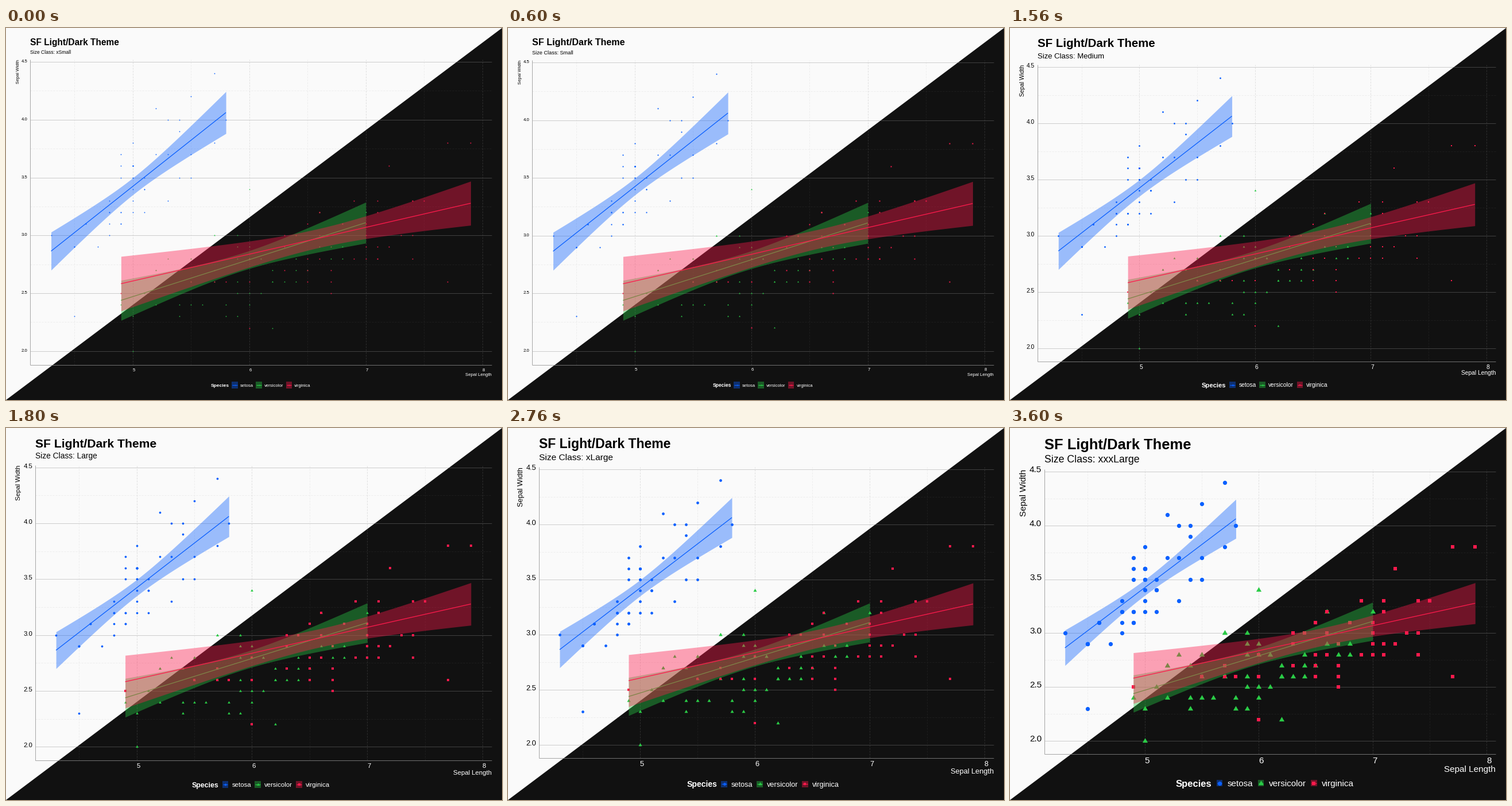
Write a matplotlib script that moves like this. It is 864 by 648 pixels and loops after 4200 ms.

```python
import numpy as np
import matplotlib.pyplot as plt
from matplotlib.animation import FuncAnimation
from matplotlib.patches import Polygon, Rectangle

W, H, RIGHT = 864, 648, 846
plt.rcParams["font.family"] = "Liberation Sans"
fig = plt.figure(figsize=(W / 72, H / 72), dpi=72)  # 1 pt equals 1 px
ax = fig.add_axes([0, 0, 1, 1])

LIGHT, DARK = "#fafafa", "#111111"
HALVES = [
    dict(corners=[(0, 0), (W, 0), (0, H)], major="#cdcdcd",
         vertical="#dfdfdf", minor="#ededed", axis="#a6a6a6"),
    dict(corners=[(W, 0), (W, H), (0, H)], major="#404040",
         vertical="#2e2e2e", minor="#1d1d1d", axis="#707070"),
]

# stats: mean and sd of length, mean and sd of width, correlation
# edge: the points that stand apart from the cloud
SPECIES = [
    dict(name="setosa", color="#0a60ff", marker="o", scale=1.0,
         stats=(5.006, 0.3525, 3.428, 0.3791, 0.7425),
         edge=[(4.3, 3.0), (4.5, 2.3), (5.2, 4.1), (5.5, 4.2), (5.7, 4.4),
               (5.7, 3.8), (5.8, 4.0), (5.5, 3.5)]),
    dict(name="versicolor", color="#2acb46", marker=(3, 0, 0), scale=1.47,
         stats=(5.936, 0.5162, 2.770, 0.3138, 0.5259),
         edge=[(4.9, 2.4), (5.0, 2.0), (5.0, 2.3), (5.2, 2.7), (6.2, 2.2),
               (6.0, 3.4), (6.8, 2.8), (7.0, 3.2)]),
    dict(name="virginica", color="#ff1a4c", marker="s", scale=0.9,
         stats=(6.588, 0.6359, 2.974, 0.3225, 0.4572),
         edge=[(4.9, 2.5), (6.0, 2.2), (6.7, 2.5), (7.7, 2.6), (7.4, 2.8),
               (7.2, 3.6), (7.7, 3.8), (7.9, 3.8)]),
]
COUNT = 50

# size class, title size, base text size
CLASSES = [
    ("xSmall", 15.5, 7.7), ("Small", 16.1, 7.8), ("Medium", 20.5, 10.3),
    ("Large", 21.1, 11.4), ("xLarge", 23, 12.8), ("xxLarge", 24.2, 13.9),
    ("xxxLarge", 25.45, 15.3),
]

CAP = 0.72  # cap height in ems


def sample(sp, rng):
    """Correlated cloud on a 0.1 grid, plus the edge points."""
    mx, sdx, my, sdy, r = sp["stats"]
    z = rng.normal(size=(4 * COUNT, 2))
    z = z[np.hypot(*z.T) < 1.75][:COUNT - len(sp["edge"])]
    x = mx + sdx * z[:, 0]
    y = my + sdy * (r * z[:, 0] + np.sqrt(1 - r * r) * z[:, 1])
    return np.vstack([np.round(np.column_stack([x, y]), 1), sp["edge"]])


rng = np.random.default_rng(7)
for sp in SPECIES:
    sp["points"] = sample(sp, rng)


def layout(i):
    name, title, base = CLASSES[i]
    grow = base - 7.7
    return dict(
        name=name, title=title, base=base,
        sub=0.92 * title - 5.7,
        sub_y=41.5 + 1.256 * (title - 15.5),
        left=round(42 + 2.37 * grow),
        top=55 + 1.74 * (title - 15.5),
        bottom=587 - 1.9 * grow - 0.086 * grow ** 2,
        legend_y=622 - 0.06 * grow ** 2,
        dot=1.8 + 0.37 * i ** 1.5,
    )


def scales(lay):
    def sx(x):
        return lay["left"] + (np.asarray(x) - 4.12) / 3.96 * (RIGHT - lay["left"])

    def sy(y):
        return lay["bottom"] - (np.asarray(y) - 1.88) / 2.64 * (lay["bottom"] - lay["top"])
    return sx, sy


def label(x, y, text, size, color="black", **kw):
    return ax.text(x, y, text, fontsize=size, color=color, va="baseline", **kw)


def mid(y, size):
    """Baseline that puts capitals centred on y."""
    return y + CAP / 2 * size


def draw_grid(lay, sx, sy):
    left, top, bottom = lay["left"], lay["top"], lay["bottom"]
    dash = (0, (3, 2))
    for half in HALVES:
        clip = Polygon(half["corners"], transform=ax.transData)

        def line(xs, ys, color, style="-"):
            ln, = ax.plot(xs, ys, color=half[color], lw=1, ls=style,
                          solid_capstyle="butt", zorder=1)
            ln.set_clip_path(clip)

        for y in np.arange(2.25, 4.5, 0.5):
            line((left, RIGHT), (sy(y),) * 2, "minor", dash)
        for x in np.arange(4.5, 8, 1):
            line((sx(x),) * 2, (bottom, top), "minor", dash)
        for x in range(5, 9):
            line((sx(x),) * 2, (bottom, top), "vertical", dash)
        for y in np.arange(2, 4.6, 0.5):
            line((left, RIGHT), (sy(y),) * 2, "major")
        line((left, left), (top, bottom), "axis")
        line((left, RIGHT), (bottom, bottom), "axis")


def draw_points(lay, sx, sy):
    for sp in SPECIES:
        x, y = sp["points"].T
        ax.plot(sx(x), sy(y), ls="", marker=sp["marker"], color=sp["color"],
                ms=lay["dot"] * sp["scale"], mew=0, zorder=2)


def draw_fits(sx, sy):
    """Regression lines with 95% bands, each species over the last."""
    for z, sp in enumerate(SPECIES, 3):
        mx, sdx, my, sdy, r = sp["stats"]
        lengths = sp["points"][:, 0]
        x = np.linspace(lengths.min(), lengths.max(), 80)
        y = my + r * sdy / sdx * (x - mx)
        err = sdy * np.sqrt((1 - r * r) * (COUNT - 1) / (COUNT - 2))
        sxx = (COUNT - 1) * sdx ** 2
        band = 2.0106 * err * np.sqrt(1 / COUNT + (x - mx) ** 2 / sxx)
        ax.fill_between(sx(x), sy(y - band), sy(y + band), color=sp["color"],
                        alpha=0.4, lw=0, zorder=z)
        ax.plot(sx(x), sy(y), color=sp["color"], lw=1.3,
                solid_capstyle="butt", zorder=z + 0.5)


def draw_labels(lay, sx, sy):
    left, top, bottom, base = (lay[k] for k in ("left", "top", "bottom", "base"))
    label(left, 18.4 + CAP * lay["title"], "SF Light/Dark Theme", lay["title"],
          weight="bold")
    label(left, mid(lay["sub_y"], lay["sub"]), "Size Class: " + lay["name"], lay["sub"])
    for y in np.arange(2, 4.6, 0.5):
        label(left - 4.8, sy(y) + 1, f"{y:.1f}", base, ha="right")
    for x in range(5, 9):
        label(sx(x), bottom + 5 + CAP * base, str(x), base, "white")
    label(RIGHT, mid(bottom + 6.4 + 1.25 * base, base), "Sepal Length", base,
          "white", ha="right")
    label(17 + 0.73 * base, top, "Sepal Width", base, rotation=90,
          rotation_mode="anchor", ha="right")


def draw_legend(lay):
    y, base = lay["legend_y"], lay["base"]
    key, gap = 10.4, 0.55 * base
    head = label(0, mid(y, 1.09 * base), "Species", 1.09 * base, "white", weight="bold")
    names = [label(0, mid(y, base), sp["name"], base, "white") for sp in SPECIES]
    widths = [t.get_window_extent().width for t in [head] + names]
    x = (lay["left"] + RIGHT - sum(widths) - 3 * key - 6 * gap) / 2
    x = x - (lay["left"] - 42) / 2  # centred on the page margins
    head.set_x(x)
    x += widths[0] + gap
    for sp, name, width in zip(SPECIES, names, widths[1:]):
        color = sp["color"]
        ax.add_patch(Rectangle((x, y - 5.75), key, 11.5, color=color, alpha=0.4, lw=0))
        ax.plot((x + 1, x + key - 1), (y, y), color=color, lw=1.2, solid_capstyle="butt")
        ax.plot(x + key / 2, y, marker=sp["marker"], color=color, mew=0,
                ms=lay["dot"] * sp["scale"])
        name.set_x(x + key + gap)
        x += key + width + 2 * gap


def draw(i):
    lay = layout(i)
    sx, sy = scales(lay)
    ax.clear()
    ax.set(xlim=(0, W), ylim=(H, 0))
    ax.axis("off")
    ax.add_patch(Rectangle((0, 0), W, H, color=LIGHT, lw=0, zorder=0))
    ax.add_patch(Polygon(HALVES[1]["corners"], color=DARK, lw=0, zorder=0))
    draw_grid(lay, sx, sy)
    draw_points(lay, sx, sy)
    draw_fits(sx, sy)
    draw_labels(lay, sx, sy)
    draw_legend(lay)
    return []


anim = FuncAnimation(fig, draw, frames=len(CLASSES), init_func=lambda: draw(0),
                     interval=600, repeat=True, repeat_delay=0)
plt.show()
```
